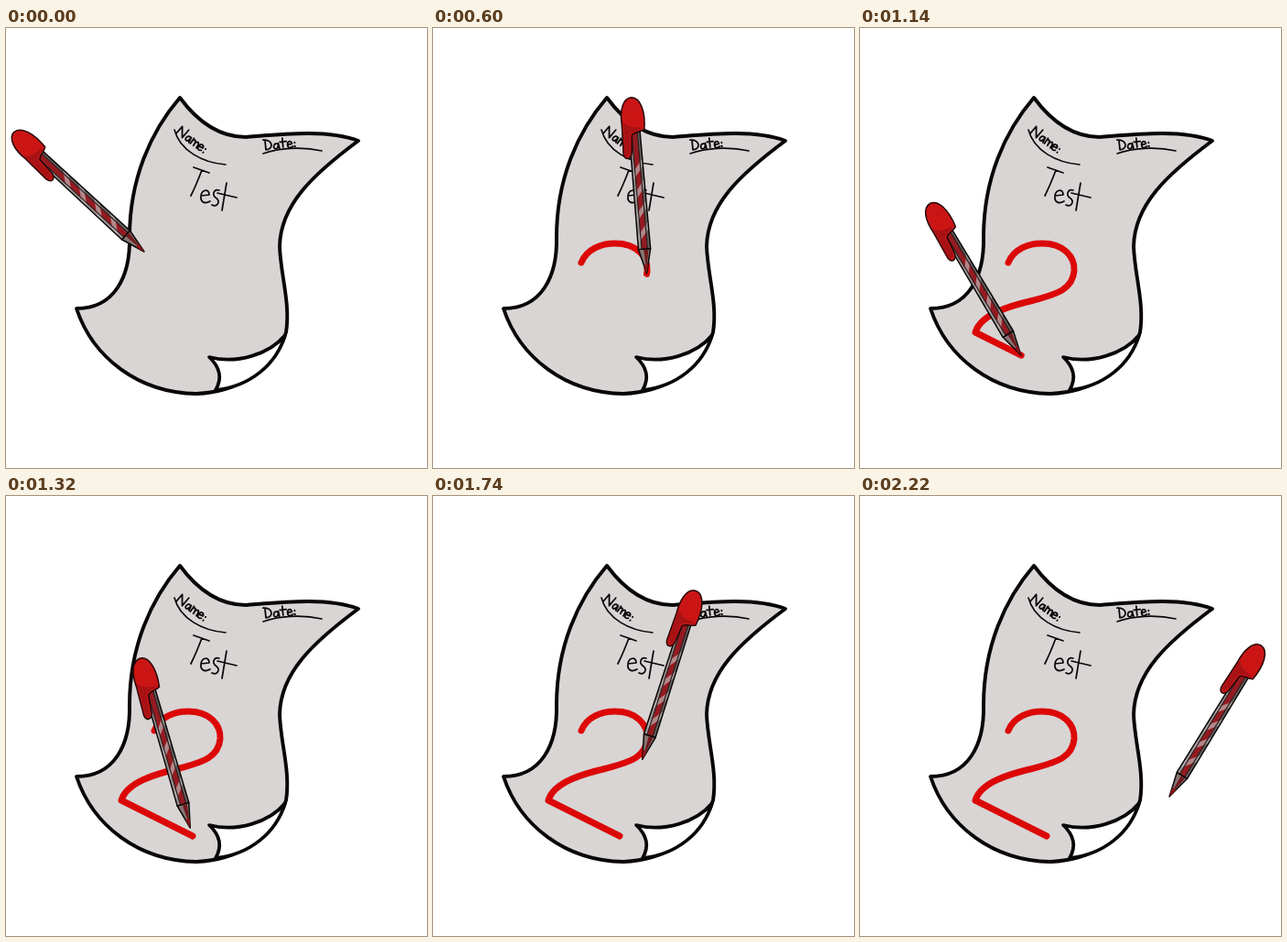
Animation of 460 by 480 pixels, one loop 2.82 s. Source, as an HTML page with a canvas:

```html
<!DOCTYPE html>
<html lang="en">
<head>
<meta charset="utf-8">
<title>Grading a test</title>
<style>
  html, body { margin: 0; width: 100%; height: 100%; overflow: hidden; background: #fff; }
  canvas { display: block; }
</style>
</head>
<body>
<canvas id="stage" width="460" height="480"></canvas>
<script>
const ctx = document.getElementById('stage').getContext('2d');
const LOOP = 2820, STEP = 60;
const WRITE = 240, LIFT = 1225, REST = 2160;
const INK = '#080606', RED = '#dc0808';

function track(d) {
  const el = document.createElementNS('http://www.w3.org/2000/svg', 'path');
  el.setAttribute('d', d);
  const length = el.getTotalLength();
  return { path: new Path2D(d), length, at: u => el.getPointAtLength(u * length) };
}

const approach = track('M151 244L162 256');
const digit = track('M162 256C168 241 184 235 199 235C222 235 235 249 234 265' +
  'C232 287 211 291 190 297C164 303 132 312 126 332L204 371');
const leave = track('M204 371C199 355 193 335 196 321C199 307 213 297 226 289C275 258 300 290 338 328');

// Pen tilt in degrees at the turning points of the gesture.
const tilt = [[360, -47.5], [600, -5], [960, -33], [1140, -31], [1740, 17.7], [REST, 31.4]];

const progress = (t, from, to) => Math.min(Math.max((t - from) / (to - from), 0), 1);
const written = t => progress(t, WRITE, LIFT) ** 1.15;

function tip(t) {
  if (t < WRITE) return approach.at(progress(t, 0, WRITE));
  if (t < LIFT) return digit.at(written(t));
  return leave.at(progress(t, LIFT, REST) ** 1.4);
}

function angle(t) {
  let a = tilt[0][1];
  for (let i = 1; i < tilt.length; i++) {
    const [from, start] = tilt[i - 1], [to, end] = tilt[i];
    a += (end - start) * progress(t, from, to);
  }
  return a * Math.PI / 180;
}

function shape(d, fill, stroke, width) {
  const p = new Path2D(d);
  if (fill) { ctx.fillStyle = fill; ctx.fill(p); }
  if (stroke) { ctx.strokeStyle = stroke; ctx.lineWidth = width; ctx.stroke(p); }
}

function placed(x, y, turn, draw) {
  ctx.save();
  ctx.translate(x, y);
  ctx.rotate(turn);
  draw();
  ctx.restore();
}

function drawPaper() {
  shape('M190 76C207 99 230 119 262 119C300 116 350 110 385 123C335 160 300 193 299 238' +
    'C300 270 311 300 306 332C293 374 252 397 208 399C145 398 95 360 77 306' +
    'C118 306 136 272 135 228C135 165 158 113 190 76Z', '#d8d5d4', INK, 3.9);
  shape('M222 359C252 367 288 356 305 335C295 368 266 391 229 395C236 383 235 371 222 359Z',
    '#fff', INK, 3.7);
}

function drawLabels() {
  shape('M184 111C190 134 215 147 240 149M281 137C298 131 322 129 345 134', null, INK, 1.6);
  placed(186, 115, 0.62, () => shape(
    'M0 0L1 -10L8 0L9 -11M16 -5C12 -8 10 -1 13 0C15 0 16 -3 16 -6L17 0' +
    'M19 0L19 -7M19 -4C21 -8 23 -6 23 0M23 -4C25 -8 27 -6 27 0' +
    'M28 -3L33 -4C32 -8 28 -7 28 -3C28 1 31 1 33 -1M36 -5v.6M36 -.6v.6', null, INK, 1.8));
  placed(283, 133, -0.1, () => shape(
    'M1 -10L1 0C10 0 10 -10 -1 -11M15 -5C10 -8 8 0 12 0C14 0 15 -3 15 -6L16 0' +
    'M20 -11L20 -1M17 -7L24 -7M25 -3L30 -4C29 -8 25 -7 25 -3C25 1 28 1 31 -1' +
    'M33 -5v.6M33 -1v.6', null, INK, 1.8));
  shape('M205 152L222 158M214 155Q208 171 202 183' +
    'M213 183L222 182C222 175 214 176 213 183C212 191 218 192 223 189' +
    'M233 177C227 175 225 182 229 185C235 189 231 196 225 193' +
    'M241 169L236 199M231 180L252 185', null, INK, 1.7);
}

function drawMark(t) {
  if (t < WRITE) return;
  ctx.save();
  ctx.setLineDash([written(t) * digit.length, digit.length * 2]);
  ctx.strokeStyle = RED;
  ctx.lineWidth = 7;
  ctx.stroke(digit.path);
  ctx.restore();
}

function drawBarrel() {
  const body = 'M-6.8 -27L-5.8 -158L6 -158L6.4 -27Z';
  ctx.save();
  ctx.clip(new Path2D(body));
  shape(body, '#9a9291');
  shape('M-3 -27V-158H3V-27Z', '#941a20');
  shape('M3 -27V-158H8V-27Z', '#696160');
  for (let y = -45; y > -120; y -= 23) {
    shape(`M-7 ${y + 9}L7 ${y - 9}`, null, 'rgba(190,182,182,.7)', 5);
  }
  shape('M-3.2 -27V-158M3.2 -27V-158', null, '#2a1b1b', 1.2);
  ctx.restore();
  shape(body, null, INK, 1.5);
}

function drawPen(t) {
  const { x, y } = tip(t);
  placed(x, y, angle(t), () => {
    shape('M-6.8 -27L6.4 -27L0 0Z', '#857472', INK, 1.5);
    shape('M-1 -26L4 -26L0 -2Z', '#701a1c');
    shape('M-2.4 -10L2.4 -10L0 0Z', '#8d1419');
    drawBarrel();
    shape('M11 -157C14 -176 10 -192 0 -193C-10 -193 -14 -179 -13 -164L-14 -132' +
      'C-13 -125 -7 -125 -5 -132L-3 -152C1 -156 6 -154 11 -157Z', '#cb1515', '#250505', 1.5);
    shape('M-12 -168L-12.5 -133C-12 -128 -8 -128 -6.5 -133L-5 -153C0 -157 5 -156 9 -159' +
      'C0 -160 -7 -160 -12 -168Z', '#a81215');
  });
}

function frame() {
  const now = performance.now() % LOOP;
  const t = Math.floor(now / STEP) * STEP;
  ctx.fillStyle = '#fff';
  ctx.fillRect(0, 0, 460, 480);
  drawPaper();
  drawLabels();
  drawMark(t);
  drawPen(t);
  requestAnimationFrame(frame);
}

ctx.lineCap = ctx.lineJoin = 'round';
frame();
</script>
</body>
</html>
```
